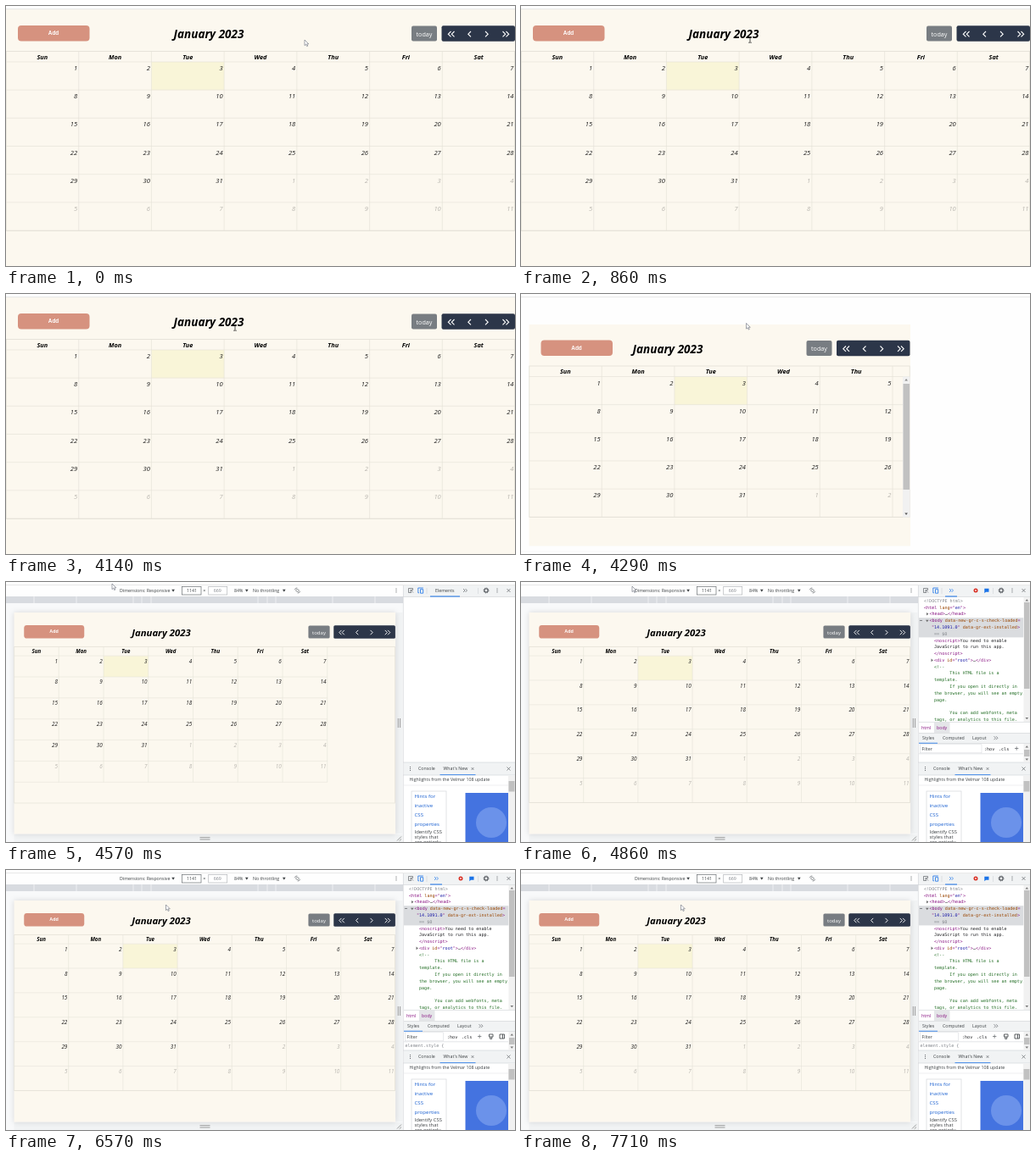
An HTML page for the animation above (8 s loop, 600 px wide and 307 px high).

```html
<!DOCTYPE html>
<html lang="en">
<head>
<meta charset="utf-8">
<title>Calendar resize</title>
<style>
html, body { margin: 0; height: 100%; overflow: hidden; background: #fff; }
svg { display: block; }
text { font-family: "Open Sans", "Noto Sans", sans-serif; white-space: pre; }
.day { font-size: 7.5px; font-style: italic; text-anchor: end; fill: #1c1c1c; }
.head { font-size: 7.3px; font-style: italic; font-weight: 700; text-anchor: middle; }
.title { font-size: 13.5px; font-style: italic; font-weight: 700; text-anchor: middle; }
.add { font: 700 6.4px "Liberation Sans", sans-serif; text-anchor: middle; fill: #fff; }
.ui { font-size: 5.25px; fill: #3c4043; }
.tip { font-size: 6.1px; fill: #1a60d0; }
.code { font: 5.08px "DejaVu Sans Mono", monospace; fill: #202124; }
.tag { fill: #881280; } .attr { fill: #994500; } .val { fill: #1a1aa6; }
.gray { fill: #80848a; } .note { fill: #236e25; }
.shade { filter: drop-shadow(0 0 3px #0002); }
</style>
</head>
<body>
<svg id="stage" width="100%" height="100%" viewBox="0 0 600 307"></svg>
<script>
const LOOP = 8000, CREAM = '#fcf8ef', LINE = '#e2dfd5', BAR = '#f1f3f4', BLUE = '#1a73e8';

const rect = (x, y, w, h, fill, extra = '') =>
  `<rect x="${x}" y="${y}" width="${w}" height="${h}" fill="${fill}" ${extra}/>`;
const text = (x, y, s, cls, extra = '') => `<text x="${x}" y="${y}" class="${cls}" ${extra}>${s}</text>`;
const path = (d, color, w = 0.7, fill = 'none') =>
  `<path d="${d}" stroke="${color}" stroke-width="${w}" fill="${fill}"/>`;
const hline = (x, y, w, color = '#cfd2d6') => path(`M${x} ${y}h${w}`, color, 0.6);
const vline = (x, y, h, color = '#cfd2d6') => path(`M${x} ${y}v${h}`, color, 0.6);
const during = (from, to, body) => `<g data-from="${from}" data-to="${to}">${body}</g>`;
const span = (cls, s) => `<tspan class="${cls}">${s}</tspan>`;
const esc = s => s.replace(/</g, '&lt;').replace(/>/g, '&gt;');

// Calendar in its own units: w wide, placed at x, y with zoom k
function calendar({ x = 0, y = 0, k = 1, w, col = w / 7, row = 33.17, bodyW = w, bodyH = 199.5 }) {
  let out = rect(14, 23, 84.5, 18.5, '#d6927f', 'rx="4"') + text(56, 34.3, 'Add', 'add')
    + text(w / 2 - 61, 38.2, 'January 2023', 'title')
    + rect(w - 122, 23.5, 30, 18, '#787d82', 'rx="2"')
    + text(w - 107, 35.6, 'today', 'ui', 'style="font-size:7.2px;fill:#fff;text-anchor:middle"')
    + rect(w - 86.5, 23.2, 86.5, 18.6, '#2c3649', 'rx="2"');
  [[-77, 1], [-73, 1], [-53.5, 1], [-33.5, -1], [-13, -1], [-9, -1]].forEach(([dx, dir]) => {
    out += path(`M${w + dx + 1.5 * dir} 30l${-3.2 * dir} 3.2l${3.2 * dir} 3.2`, '#fff', 1.1);
  });

  let heads = '', cells = rect(2 * col, 0, col, row, '#f9f5d8');
  ['Sun', 'Mon', 'Tue', 'Wed', 'Thu', 'Fri', 'Sat'].forEach((name, i) => {
    heads += text((i + 0.5) * col, 9.3, name, 'head') + vline((i + 1) * col, 0, 12.5, LINE);
    cells += vline((i + 1) * col, 0, 6 * row, LINE);
  });
  for (let i = 0; i < 42; i++) {
    const r = Math.floor(i / 7), outside = i > 30;
    cells += text((i % 7 + 1) * col - 1.6, r * row + 10.1, outside ? i - 30 : i + 1, 'day',
      outside ? 'opacity=".3"' : '');
    if (i % 7 == 0) cells += hline(0, (r + 1) * row, 7 * col, LINE);
  }
  out += `<svg y="53.5" width="${w}" height="13">${heads}</svg>`
    + `<svg y="66" width="${bodyW}" height="${bodyH}">${cells}</svg>`
    + hline(0, 66, w, LINE)
    + rect(0.3, 53.5, w - 0.6, 12.5 + bodyH, 'none', `stroke="${LINE}" stroke-width=".8"`);
  return `<g transform="translate(${x} ${y}) scale(${k})">${out}</g>`;
}

const topLine = rect(0, 0, 600, 4, '#fdfdfd') + hline(0, 3.6, 600, '#d9d9d9');
const page = rect(9.5, 36, 449.5, 261.5, CREAM, 'class="shade"');
const cross = (x, y, r = 2, color = '#5f6368') =>
  path(`M${x - r} ${y - r}l${2 * r} ${2 * r}m0 ${-2 * r}l${-2 * r} ${2 * r}`, color);
const dots = (x, y) => [-2, 0, 2].map(d => rect(x - 0.5, y + d - 0.5, 1, 1, '#5f6368')).join('');
const drop = (x, y) => path(`M${x} ${y}h3.6l-1.8 3z`, 'none', 0, '#3c4043');
const more = (x, y, color = '#5f6368') => path(`M${x - 2} ${y - 2}l2 2l-2 2m2.5 -4l2 2l-2 2`, color);
const fold = (x, y) => path(`M${x} ${y}l2.4 1.8l-2.4 1.8z`, 'none', 0, '#6e6e6e');

function fullPage() {
  return rect(0, 0, 600, 307, CREAM) + topLine + calendar({ w: 600 });
}

function croppedPage() {
  return rect(0, 0, 600, 307, '#fefefe') + topLine + hline(0, 304, 600, '#f1f1f1')
    + rect(9.5, 36, 449.5, 261.5, CREAM)
    + calendar({ x: 9.5, y: 31.5, w: 449, col: 85.7, bodyW: 440.5, bodyH: 166 })
    + rect(450, 97.5, 8.5, 166, '#f1f1f1') + rect(450.5, 106, 7.5, 125, '#c1c1c1')
    + path('M452.3 102.5h3.6l-1.8 -2.4z', 'none', 0, '#888') + path('M452.3 258.5h3.6l-1.8 2.4z', 'none', 0, '#555');
}

function deviceFrame() {
  let out = rect(0, 0, 600, 307, '#f8f9fa') + rect(0, 0, 468, 17, '#fefefe') + topLine
    + text(134, 12.2, 'Dimensions: Responsive', 'ui') + drop(195.3, 8.8)
    + rect(207.5, 5.5, 22.5, 9.5, '#fff', 'stroke="#6b6f74" stroke-width=".7"') + text(213, 12.2, '1141', 'ui')
    + text(232.3, 12.2, '×', 'ui')
    + rect(238.7, 5.5, 22, 9.5, '#fff', 'stroke="#b4b7bb" stroke-width=".7"') + text(244.7, 12.2, '669', 'ui gray')
    + text(269, 12.2, '84%', 'ui') + drop(282, 8.8)
    + text(291, 12.2, 'No throttling', 'ui') + drop(326, 8.8)
    + path('M343.5 8l2 2l-2 2l-2 -2zM340.3 9.2a3.2 3.2 0 0 1 3 -2.3M346.7 10.8a3.2 3.2 0 0 1 -3 2.3', '#5f6368')
    + dots(460, 10) + rect(0, 17, 468, 8, '#d8dbe0');
  for (const d of [63, 74, 84, 151, 201])
    out += vline(234 - d, 17, 8, '#fff') + vline(234 + d, 17, 8, '#fff');
  return out + rect(459.5, 36, 8, 261, BAR) + rect(9.5, 298, 450, 9, BAR) + rect(459.5, 298, 8, 9, BAR) + page
    + path('M462.3 161v11m2.3 0v-11M228.5 301.7h12m0 2.3h-12M461 305.5l5 -5m0 3l-2.3 2.3', '#777');
}

function toolsFrame() {
  return rect(468, 0, 132, 307, '#fff') + rect(468, 4, 132, 13.5, BAR) + hline(468, 3.6, 132, '#d9d9d9')
    + hline(468, 17.5, 132) + vline(468.4, 4, 303)
    + path('M478 12.5h-3.5v-5h5v2M477 9.5l3 3m-3 -3v2.5m0 -2.5h2.5', '#5f6368')
    + path('M487 12.8h-1.2v-5.8h6M488.5 8.7h3.2v4.5h-3.2z', BLUE, 0.8) + vline(496, 7, 7)
    + vline(556.5, 7, 7)
    + '<circle cx="566" cy="10" r="2.1" fill="none" stroke="#5f6368" stroke-width="1.3"/>'
    + '<circle cx="566" cy="10" r="3" fill="none" stroke="#5f6368" stroke-width=".9" stroke-dasharray="1.2 1.16"/>'
    + dots(579, 10) + cross(592.5, 10)
    // lower drawer
    + rect(469, 213, 131, 15, BAR) + hline(468, 213, 132) + hline(468, 228, 132)
    + dots(476.5, 220.5) + text(486, 222.4, 'Console', 'ui') + text(515.5, 222.4, "What's New", 'ui')
    + cross(550, 220.5, 1.4) + cross(592.5, 220.5) + rect(511.5, 227.3, 42, 0.8, BLUE)
    + text(475.5, 235.4, 'Highlights from the Velmar 108 update', 'ui') + hline(469, 240, 123, '#e3e5e8')
    + rect(478, 247, 41, 62, '#fff', 'stroke="#d5d7da" stroke-width=".7"')
    + ['Hints for', 'inactive', 'CSS', 'properties'].map((s, i) => text(481.5, 255.3 + 11 * i, s, 'tip')).join('')
    + ['Identify CSS', 'styles that', 'are entirely'].map((s, i) =>
        text(481.5, 297.3 + 6 * i, s, 'ui', 'style="font-size:5.9px"')).join('')
    + rect(541.5, 249, 50.5, 58, '#4473e0') + '<circle cx="572" cy="284" r="18" fill="#6b92ea"/>'
    + rect(592, 229, 8, 78, '#f1f1f1') + rect(592.5, 235, 7, 12.5, '#c1c1c1');
}

const elementsTab = text(506, 12.2, 'Elements', 'ui') + rect(500, 16.5, 35, 1, BLUE) + more(541, 10);

function domPanel() {
  const tag = s => span('tag', esc(s)), attr = s => span('attr', s), val = s => span('val', s);
  const rows = [
    [475, span('gray', esc('<!DOCTYPE html>'))],
    [475, tag('<html ') + attr('lang') + tag('="') + val('en') + tag('">')],
    [481.5, tag('<head>') + '…' + tag('</head>')],
    [481.5, tag('<body ') + attr('data-new-gr-c-s-check-loaded') + tag('=')],
    [484, tag('"') + val('14.1091.0') + tag('" ') + attr('data-gr-ext-installed') + tag('>')],
    [484, span('gray', ' == $0')],
    [487, tag('<noscript>') + 'You need to enable'],
    [487, 'JavaScript to run this app.'],
    [487, tag('</noscript>')],
    [487, tag('<div ') + attr('id') + tag('="') + val('root') + tag('">') + '…' + tag('</div>')],
    ...['<!--', '      This HTML file is a', 'template.', '      If you open it directly in',
      'the browser, you will see an empty', 'page.', '', '      You can add webfonts, meta',
      'tags, or analytics to this file.'].map(s => [487, span('note', esc(s))])
  ];
  return more(507, 10, BLUE) + rect(500, 16.5, 14, 1, BLUE)
    + '<circle cx="536" cy="10" r="2.5" fill="#d93025"/>' + cross(536, 10, 0.9, '#fff')
    + path('M546.3 7.8h5.2v4h-3.5l-1.7 1.5z', 'none', 0, BLUE) + rect(469, 42.2, 123.5, 23.2, '#dadcdf')
    + rows.map(([x, s], i) => text(x, 23.9 + 7.78 * i, s, 'code')).join('')
    + fold(478, 36) + fold(483.5, 90.6) + path('M477 44.7h3.6l-1.8 2.6z', 'none', 0, '#6e6e6e')
    + text(470, 47.3, '⋯', 'code')
    + rect(592.5, 18, 7.5, 147, '#f1f1f1') + rect(593, 24, 6.5, 102, '#c1c1c1')
    + path('M594.5 22.5h3.6l-1.8 -2.2zM594.5 160h3.6l-1.8 2.2z', 'none', 0, '#777')
    // breadcrumb and style tabs
    + rect(469, 165.5, 131, 13, '#fff') + hline(469, 165.5, 131) + rect(487, 166, 18.5, 12, '#e4e5e8')
    + text(472, 173.7, 'html', 'ui tag') + text(490, 173.7, 'body', 'ui tag')
    + rect(469, 178.5, 131, 12, BAR) + hline(469, 178.5, 131) + hline(469, 190.5, 131)
    + text(473, 186.2, 'Styles', 'ui') + text(497, 186.2, 'Computed', 'ui') + text(532, 186.2, 'Layout', 'ui')
    + more(559.5, 184.2) + rect(469, 189.8, 22, 0.8, BLUE)
    + hline(469, 202.8, 123) + rect(592.5, 191, 7.5, 22, '#f1f1f1') + rect(593, 198, 6.5, 8, '#c1c1c1')
    + path('M594.5 195.5h3.6l-1.8 -2.2zM594.5 208.5h3.6l-1.8 2.2z', 'none', 0, '#777');
}

const filterRow = (w, x) => rect(470.5, 191.8, w, 10, '#fff', 'stroke="#dadce0" stroke-width=".6"')
  + text(472.5, 198.6, 'Filter', 'ui') + text(x, 198.6, ':hov', 'code') + text(x + 17, 198.6, '.cls', 'code')
  + path(`M${x + 36} 196.5h4.4m-2.2 -2.2v4.4`, '#5f6368');
const styleIcons = path('M569.5 194h4.5v3h-4.5zm1.2 3v2.4h2v-2.4M582 194h5.5v5h-5.5zm3.5 0v5', '#4a4e52', 0.9)
  + text(470.5, 208.6, 'element.style {', 'code gray');
const tabletHint = rect(83, 17, 302, 8, '#000', 'opacity=".05"')
  + text(234, 23.2, 'Tablet – 768px', 'ui', 'text-anchor="middle"');

const zoomed = { x: 9.5, y: 31.7, k: 0.84, w: 535 };
const stage = document.getElementById('stage');
stage.innerHTML =
  during(0, 4290, fullPage())
  + during(4290, 4430, croppedPage())
  + during(4430, LOOP, deviceFrame() + toolsFrame())
  + during(4430, 4710, calendar({ ...zoomed, col: 62.8, row: 29.6, bodyH: 207 }))
  + during(4710, LOOP, calendar({ ...zoomed, row: 34.4, bodyH: 206.6 }))
  + during(4430, 4860, elementsTab)
  + during(4860, LOOP, domPanel())
  + during(4860, 5430, filterRow(72.5, 546))
  + during(5430, LOOP, filterRow(45, 520) + styleIcons)
  + during(5140, 5430, tabletHint)
  + '<g id="cursor">' + path('M0 0v6.6l1.6 -1.4l1.1 2.4l1.1 -.5l-1.1 -2.3h2.1z', '#666b78', 0.6, '#fff') + '</g>'
  + '<g id="beam">' + path('M-1.8 -3.2h1.4l.4 .4l.4 -.4h1.4M0 -2.8v5.6M-1.8 3.2h1.4l.4 -.4l.4 .4h1.4', '#222', 0.8) + '</g>';

// Pointer stops: time, x, y, and 1 for the text beam
const stops = [
  [0, 352, 40], [140, 311, 41], [290, 270, 40, 1], [4290, 265.5, 34.5], [4430, 195, 18], [4570, 125, 2],
  [4860, 131, 5], [5000, 138, 10], [5140, 145, 15], [5290, 149.5, 18], [5430, 163, 27], [5570, 178, 35], [5710, 188.5, 41]
];
const parts = [...stage.querySelectorAll('[data-from]')];
const cursor = document.getElementById('cursor'), beam = document.getElementById('beam');
const show = (el, on) => { el.style.display = on ? '' : 'none'; };

function draw() {
  const t = performance.now() % LOOP;
  for (const p of parts) show(p, t >= +p.dataset.from && t < +p.dataset.to);
  const [, x, y, isBeam] = stops.filter(s => s[0] <= t).pop();
  show(cursor, !isBeam);
  show(beam, isBeam);
  (isBeam ? beam : cursor).setAttribute('transform', `translate(${x} ${y})`);
  requestAnimationFrame(draw);
}
draw();
</script>
</body>
</html>
```
